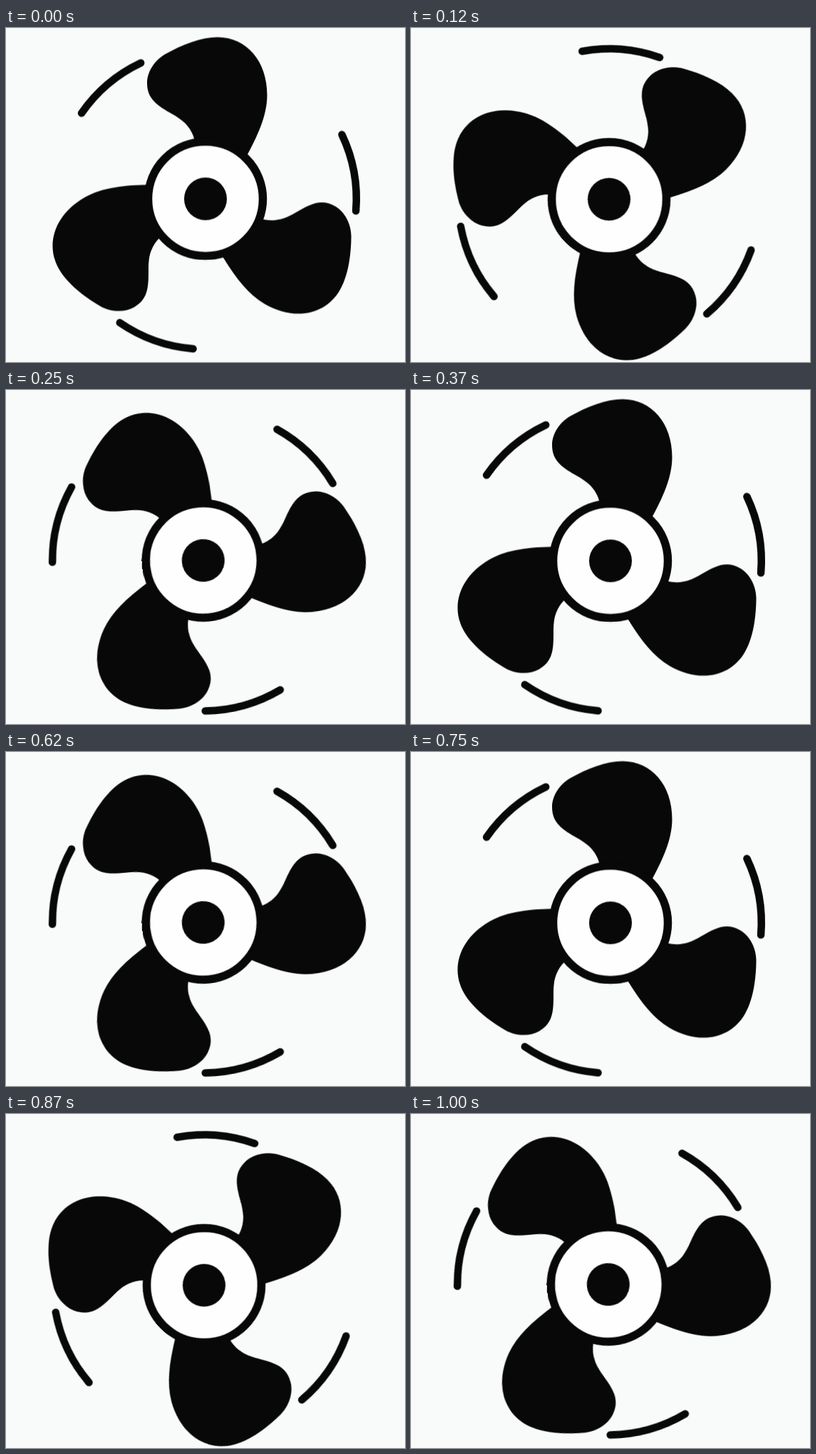
Recreate the animation shown at these times as an HTML page. Size 560 by 470 pixels, loop 1.12 s.

```html
<!DOCTYPE html>
<html lang="en">
<head>
<meta charset="utf-8">
<title>Spinning fan</title>
<style>
  html, body { margin: 0; width: 100%; height: 100%; overflow: hidden; background: #f9fbfa; }
  svg { display: block; width: 560px; height: 470px; }
  .ink { fill: #080808; }
  .dash { fill: none; stroke: #080808; stroke-width: 10.5; stroke-linecap: round; }
  .hub { fill: #fefefe; stroke: #080808; stroke-width: 11.5; }

  /* Three held poses, repeated three times per loop */
  #fan {
    transform-origin: 0 0;
    animation: spin 1120ms step-end infinite;
  }
  @keyframes spin {
    0%, 33.03%, 66.96% { transform: translate(280px, 240.4px) rotate(0deg); }
    10.71%, 44.64%, 77.67% { transform: translate(278px, 241px) rotate(45deg); }
    22.32%, 55.35%, 89.28%, 100% { transform: translate(276.8px, 239.9px) rotate(84.6deg); }
  }
</style>
</head>
<body>
<svg viewBox="0 0 560 470" role="img" aria-label="Spinning fan">
  <defs>
    <g id="blade">
      <path class="ink" d="M0 0 L-14 -78
        C-18.5 -99 -29 -109.5 -46.6 -119.3
        C-67 -131 -82 -140 -82 -163
        C-82 -178 -72 -194.5 -56.8 -203.4
        C-33 -217 -6 -227.5 17 -227.5
        C57.5 -227.5 86.5 -194 86.5 -146
        C86.5 -117 73 -88 56 -57 Z"/>
      <path class="dash" d="M-174 -120.6 A211.7 211.7 0 0 1 -90.8 -191.3"/>
    </g>
  </defs>
  <g id="fan">
    <use href="#blade"/>
    <use href="#blade" transform="rotate(120)"/>
    <use href="#blade" transform="rotate(240)"/>
    <circle class="hub" r="80.5"/>
    <circle class="ink" r="30"/>
  </g>
</svg>
</body>
</html>
```
